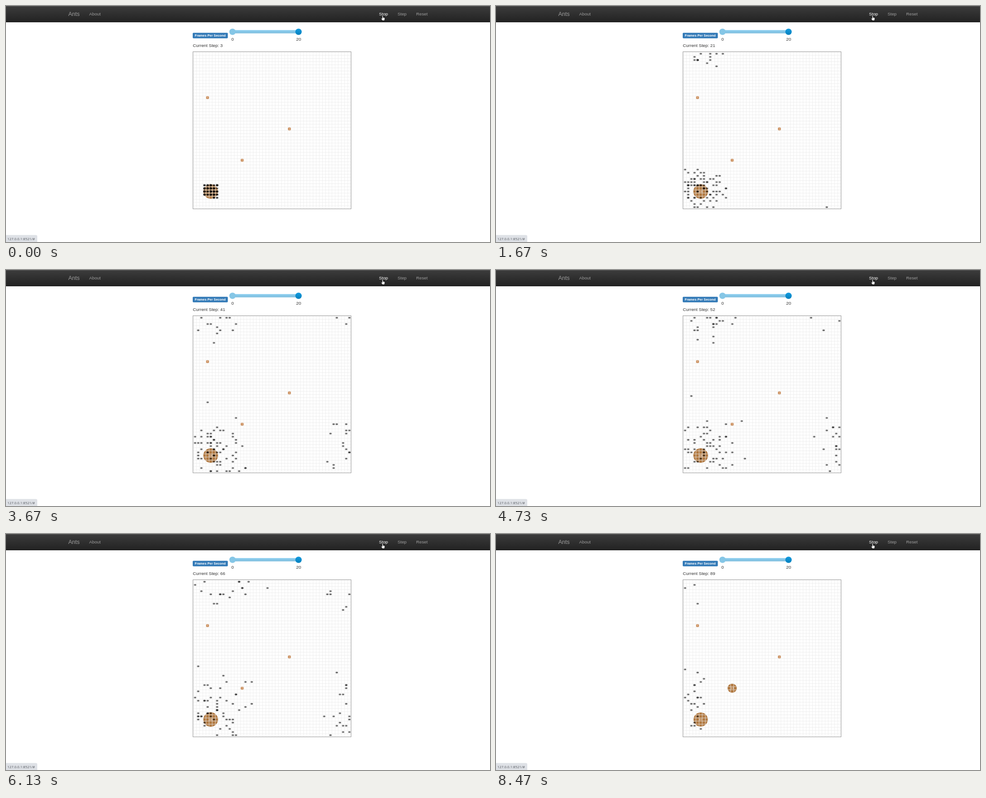
Recreate the animation shown at these times as an HTML page with a canvas. Size 1068 px wide and 524 px high, loop 8540 ms.

```html
<!DOCTYPE html>
<html lang="en">
<head>
<meta charset="utf-8">
<title>Ants</title>
<style>
  html, body { margin: 0; width: 100%; height: 100%; overflow: hidden; background: #fff; }
  svg, canvas { position: absolute; left: 0; top: 0; width: 1068px; height: 524px; display: block; }
  text { font: 9.73px "Liberation Sans", Arial, sans-serif; fill: #333; }
  .nav text { fill: #9d9d9d; }
  .nav .brand { font-size: 12.5px; }
  .nav .active { fill: #fff; }
  .badge { font-size: 7.3px; font-weight: bold; fill: #fff; }
  .status { font: 7.8px "Open Sans", "Noto Sans", sans-serif; fill: #50545a; }
</style>
</head>
<body>
<svg viewBox="0 0 1068 524">
  <defs>
    <linearGradient id="bar" x2="0" y2="1"><stop stop-color="#3c3c3c"/><stop offset="1" stop-color="#222"/></linearGradient>
    <linearGradient id="track" x2="0" y2="1"><stop stop-color="#89cdef"/><stop offset="1" stop-color="#81bfde"/></linearGradient>
    <linearGradient id="knob" x2="0" y2="1"><stop stop-color="#149bdf"/><stop offset="1" stop-color="#0480be"/></linearGradient>
  </defs>
  <g class="nav">
    <rect width="1068" height="36" fill="url(#bar)"/>
    <rect width="1068" height="1" fill="#5a5a5a"/>
    <rect y="35.3" width="1068" height=".8" fill="#080808"/>
    <text class="brand" x="137.5" y="22">Ants</text>
    <text x="183.5" y="21">About</text>
    <text class="active" x="823" y="21">Stop</text>
    <text x="864" y="21">Step</text>
    <text x="905" y="21">Reset</text>
  </g>
  <path d="M830 21.2q1.2-1.2 2 .2v4l3 .7q1.200.4 1 1.600l-.5 3-.9 1.500h-4l-2.800-4q-.2-1.300 1.200-.9l1 .8z" fill="#fff" stroke="#111" stroke-width=".7"/>
  <rect x="412" y="59.500" width="77.500" height="12.300" rx="1.800" fill="#337ab7"/>
  <text class="badge" x="416.500" y="68.200">Frames Per Second</text>
  <rect x="500" y="53.600" width="146" height="7.200" rx="2.500" fill="url(#track)"/>
  <circle cx="499.800" cy="57.200" r="7" fill="#85c6e6"/>
  <circle cx="645.500" cy="57.200" r="7" fill="url(#knob)"/>
  <text x="500" y="76.500" text-anchor="middle">0</text>
  <text x="645.700" y="76.500" text-anchor="middle">20</text>
  <text id="counter" x="412.300" y="90.500">Current Step: 3</text>
  <path d="M0 508.500h66q3 0 3 3V524H0z" fill="#dee1e6"/>
  <text class="status" x="3" y="519.500">127.0.0.1:8521/#</text>
</svg>
<canvas id="stage" width="1068" height="524"></canvas>
<script>
const LOOP = 8540, TICK = 200 / 3, LAST_TICK = 127;
const SIZE = 50, CELL = 6.95, LEFT = 413.4, TOP = 102.6;
const NEST = [5, 44], DROP = [15, 34];
const EMPTY_FOOD = [[4, 14], [30, 24]];
const ANTS = 100, LAST_STEP = 90, TRIP = 10;
// [tick, simulation step]; the fraction is the redraw progress within a step
const PACE = [[0, 3.3], [14, 13.3], [38, 30.5], [71, 52.5], [92, 66.5], [110, 78.5], [127, 89.027]];
// [departure step, column offset, row offset] of ants carrying from nest to drop
const CARRIERS = [[68, 0, 0], [70, 0, 0], [71, 0, 0], [71, -1, 0], [71, 0, 1], [71, 0, 0],
  ...Array.from({ length: 7 }, (_, i) => [79, i % 3 - 1, i % 2])];

const ctx = document.getElementById('stage').getContext('2d');
const counter = document.getElementById('counter');
const colX = c => LEFT + (c + .5) * CELL;
const rowY = r => TOP + (r + .5) * CELL;
const wrap = v => (v + SIZE) % SIZE;

function seeded(seed) {
  return () => {
    seed = seed + 0x6D2B79F5 | 0;
    let n = Math.imul(seed ^ seed >>> 15, 1 | seed);
    n = n + Math.imul(n ^ n >>> 7, 61 | n) ^ n;
    return ((n ^ n >>> 14) >>> 0) / 4294967296;
  };
}

function simulate() {
  const random = seeded(8521);
  const stride = () => Math.floor(random() * 3) - 1;
  let ants = Array.from({ length: ANTS }, () => ({ c: NEST[0], r: NEST[1] }));
  const history = [ants, ants];
  for (let step = 2; step <= LAST_STEP; step++) {
    ants = ants.map(({ c, r }, i) => {
      const dc = stride(), dr = stride();
      const [start, oc, or] = CARRIERS[i] || [Infinity, 0, 0];
      const p = step - start;
      if (p >= 0 && p <= TRIP) {
        const away = p > 0 && p < TRIP;
        return { c: NEST[0] + p + oc * away, r: NEST[1] - p + or * away, loaded: away };
      }
      return { c: wrap(c + dc), r: wrap(r + dr) };
    });
    history.push(ants);
  }
  return history;
}

const history = simulate();

const body = new Path2D();
for (const [x, rx, ry] of [[-1.5, 1.2, .8], [.2, .9, .8], [1.7, .9, .8]]) {
  body.moveTo(x + rx, 0);
  body.ellipse(x, 0, rx, ry, 0, 0, Math.PI * 2);
}
const legs = new Path2D('M.2 0L-1.400-2.300M.3 0L.5-2.500M.5 0L2-1.800M.2 0L-1.400 2.300M.3 0L.5 2.500M.5 0L2 1.800M1.800 0L3-.8M1.800 0L3 .8');

function drawAnt({ c, r, loaded }) {
  ctx.save();
  ctx.translate(colX(c), rowY(r));
  ctx.globalAlpha = loaded ? .95 : .72;
  ctx.fillStyle = ctx.strokeStyle = loaded ? '#1440f0' : '#0c0c0c';
  ctx.lineWidth = .55;
  ctx.stroke(legs);
  ctx.fill(body);
  ctx.restore();
}

function drawDisc([c, r], radius, color) {
  ctx.fillStyle = color;
  ctx.beginPath();
  ctx.arc(colX(c), rowY(r), radius, 0, Math.PI * 2);
  ctx.fill();
}

function drawLabel([c, r], value) {
  ctx.fillStyle = '#fff';
  ctx.fillText(value, colX(c), rowY(r) + .3);
}

function drawGrid() {
  ctx.strokeStyle = '#ebebeb';
  ctx.lineWidth = .8;
  ctx.beginPath();
  const span = SIZE * CELL;
  for (let i = 0; i <= SIZE; i++) {
    const x = LEFT + i * CELL, y = TOP + i * CELL;
    ctx.moveTo(x, TOP);
    ctx.lineTo(x, TOP + span);
    ctx.moveTo(LEFT, y);
    ctx.lineTo(LEFT + span, y);
  }
  ctx.stroke();
  ctx.strokeStyle = '#9c9c9c';
  ctx.lineWidth = 1;
  ctx.strokeRect(412.5, 101.5, 349, 349);
}

function progressAt(tick) {
  const i = Math.max(1, PACE.findIndex(([at]) => at >= tick));
  const [t0, s0] = PACE[i - 1], [t1, s1] = PACE[i];
  return tick === t1 ? s1 : s0 + (s1 - s0) * (tick - t0) / (t1 - t0);
}

function draw(tick) {
  const progress = progressAt(tick), step = Math.floor(progress);
  const drawnColumns = (progress - step) * 250;
  const taken = CARRIERS.filter(([start]) => step >= start).length;
  const dropped = CARRIERS.filter(([start]) => step >= start + TRIP).length;
  counter.textContent = 'Current Step: ' + step;

  ctx.clearRect(0, 0, 1068, 524);
  ctx.font = '6px "Liberation Sans", Arial, sans-serif';
  ctx.textAlign = 'center';
  ctx.textBaseline = 'middle';
  const dropColor = dropped ? '#b27a42' : '#c68148';
  drawDisc(NEST, 16.2 - taken * .035, '#b27a42');
  drawDisc(DROP, CELL / 2 * Math.log(dropped * 1.25 + Math.E), dropColor);
  EMPTY_FOOD.forEach(cell => drawDisc(cell, CELL / 2, '#c68148'));
  drawGrid();
  drawLabel(NEST, 100 - taken);
  drawLabel(DROP, dropped);
  EMPTY_FOOD.forEach(cell => drawLabel(cell, 0));
  // ants repaint column by column after each step
  history[step].filter(ant => ant.c < drawnColumns).forEach(drawAnt);
}

const origin = performance.now();
let shown = -1;
function frame(now) {
  const t = Math.max(0, now - origin) % LOOP;
  const tick = Math.min(LAST_TICK, Math.floor((t + 5) / TICK));
  if (tick !== shown) draw(shown = tick);
  requestAnimationFrame(frame);
}
frame(origin);
</script>
</body>
</html>
```
